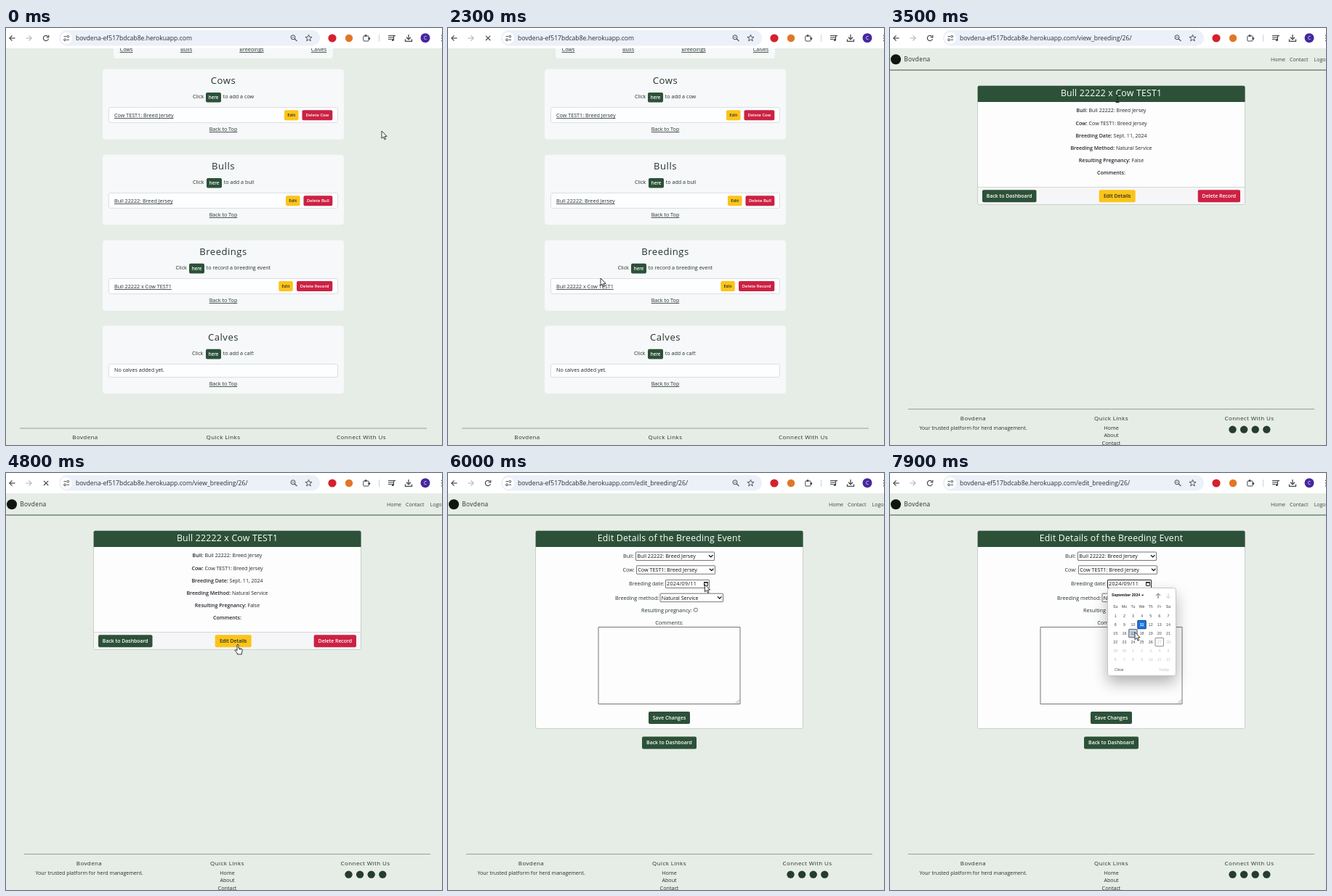
Recreate the animation shown at these times as an HTML page with a canvas. Size 600x575 px, loop 8000 ms.

```html
<!DOCTYPE html>
<html lang="en">
<head>
<meta charset="utf-8">
<title>Herd dashboard</title>
<style>
html, body { margin: 0; width: 100%; height: 100%; overflow: hidden; background: #e6ede6; }
canvas { display: block; width: 600px; height: 575px; }
</style>
</head>
<body>
<canvas id="stage" width="600" height="575"></canvas>
<script>
const ctx = document.getElementById('stage').getContext('2d');
const LOOP = 8000, STEP = 100;
const SANS = '"Open Sans", "Noto Sans", sans-serif';
const ARIAL = '"Liberation Sans", Arial, sans-serif';
const GREEN = '#2c5138', YELLOW = '#fbc41a', RED = '#cc2143', PAGE = '#e6ede6';
const INK = '#24332a', SITE = 'Bovdena';
const HOST = 'bovdena-ef517bdcab8e.herokuapp.com';

// ---- helpers ----
function box(x, y, w, h, r, fill, stroke) {
  ctx.beginPath();
  ctx.roundRect(x, y, w, h, r);
  if (fill) { ctx.fillStyle = fill; ctx.fill(); }
  if (stroke) { ctx.strokeStyle = stroke; ctx.lineWidth = 1; ctx.stroke(); }
}

function dot(x, y, r, fill) {
  ctx.beginPath();
  ctx.arc(x, y, r, 0, 7);
  ctx.fillStyle = fill;
  ctx.fill();
}

function line(color, width, ...pts) {
  ctx.beginPath();
  for (let i = 0; i < pts.length; i += 2) ctx.lineTo(pts[i], pts[i + 1]);
  ctx.strokeStyle = color;
  ctx.lineWidth = width;
  ctx.stroke();
}

function setFont({ size = 7.2, weight = 400, family = SANS, gap = 0 }) {
  ctx.font = `${weight} ${size}px ${family}`;
  ctx.letterSpacing = gap + 'px';
}

// y is the middle of the capitals
function text(s, x, y, o = {}) {
  const { size = 7.2, align = 'left', color = INK, under } = o;
  setFont(o);
  const w = ctx.measureText(s).width;
  const left = align === 'center' ? x - w / 2 : align === 'right' ? x - w : x;
  const base = y + size * 0.36;
  ctx.fillStyle = color;
  ctx.fillText(s, left, base);
  if (under) ctx.fillRect(left, Math.round(base) + 1, w, 0.8);
  return w;
}

const center = (s, x, y, o) => text(s, x, y, { align: 'center', ...o });

function button(s, x, y, w, h, fill, size, color = '#fff') {
  box(x, y, w, h, 2, fill);
  center(s, x + w / 2, y + h / 2, { size, weight: 600, color });
}

// ---- browser bar ----
function toolbar(path, loading) {
  const grey = '#46494d';
  ctx.fillStyle = '#fff';
  ctx.fillRect(0, 0, 600, 28);
  box(73, 3, 359, 21.5, 10.7, '#ebf0f9');

  line(grey, 1.2, 12.5, 14, 5, 14);
  line(grey, 1.2, 8.5, 10.3, 4.8, 14, 8.5, 17.7);
  line('#b5b7ba', 1.1, 27.5, 14, 35, 14);
  line('#b5b7ba', 1.1, 31.5, 10.3, 35.2, 14, 31.5, 17.7);

  if (loading) {
    line(grey, 1.2, 52, 10.8, 58.2, 17);
    line(grey, 1.2, 58.2, 10.8, 52, 17);
  } else {
    ctx.beginPath();
    ctx.arc(55, 14, 3.6, 0.3, 5.5);
    ctx.strokeStyle = grey;
    ctx.lineWidth = 1.2;
    ctx.stroke();
    line(grey, 1.2, 58.8, 9.8, 58.8, 12.8, 55.8, 12.8);
  }

  dot(83, 14, 8, '#fff');
  line(grey, 1, 79.5, 11.7, 83, 11.7);
  line(grey, 1, 83.5, 16.3, 87, 16.3);
  for (const [x, y] of [[85.3, 11.7], [81, 16.3]]) {
    ctx.beginPath();
    ctx.arc(x, y, 1.4, 0, 7);
    ctx.stroke();
  }

  text(HOST + path, 96, 13.8, { size: 8.6, color: '#2c2f33' });

  ctx.beginPath();
  ctx.arc(395, 12.8, 3, 0, 7);
  ctx.stroke();
  line(grey, 1.1, 397.2, 15, 400.5, 18.2);
  line(grey, 0.8, 393.5, 12.8, 396.5, 12.8);

  ctx.beginPath();
  for (let i = 0; i < 10; i++) {
    const r = i % 2 ? 2 : 4.8, a = i * Math.PI / 5 - Math.PI / 2;
    ctx.lineTo(416.5 + r * Math.cos(a), 14 + r * Math.sin(a));
  }
  ctx.closePath();
  ctx.lineWidth = 0.9;
  ctx.strokeStyle = grey;
  ctx.stroke();

  dot(449, 14, 5.6, '#d5212e');
  dot(472, 14, 5.2, '#e27625');

  box(491.8, 11, 7.4, 7, 1, null, grey);
  dot(495, 10.4, 1.5, grey);
  dot(499.8, 14.5, 1.5, grey);
  line('#c9d3e6', 1, 513.5, 9, 513.5, 19);
  for (const [y, w] of [[10.5, 8], [13, 8], [15.5, 4.5]]) line(grey, 1.1, 526, y, 526 + w, y);
  line(grey, 1.1, 533.5, 16.5, 533.5, 10.6, 536, 10.6);
  dot(532.3, 16.4, 1.6, grey);
  line(grey, 1.3, 554, 9, 554, 15.5);
  line(grey, 1.3, 551, 12.8, 554, 15.8, 557, 12.8);
  line(grey, 1.3, 549.5, 15.5, 549.5, 18.4, 558.5, 18.4, 558.5, 15.5);
  dot(577, 13.7, 6.5, '#4527a0');
  center('C', 577, 13.7, { size: 6.5, color: '#fff' });
  for (const y of [10.5, 14, 17.5]) dot(600, y, 0.9, grey);
}

// ---- pages ----
const sections = [
  { top: 56.7, h: 97, title: 'Cows', say: 'to add a cow', item: 'Cow TEST1: Breed Jersey',
    click: 257, here: 275, edit: 383, del: 407.5, kind: 'Delete Cow' },
  { top: 174.7, h: 96.5, title: 'Bulls', say: 'to add a bull', item: 'Bull 22222: Breed Jersey',
    click: 257, here: 276, edit: 385, del: 409.5, kind: 'Delete Bull' },
  { top: 292.6, h: 97.3, title: 'Breedings', say: 'to record a breeding event', item: 'Bull 22222 x Cow TEST1',
    click: 233.5, here: 252, edit: 375.3, del: 400, kind: 'Delete Record' },
  { top: 410.6, h: 93.4, title: 'Calves', say: 'to add a calf:', click: 256, here: 275 }
];
const navX = [165.5, 248, 338, 430.5];
const head = { size: 13.1, gap: 0.5, weight: 500 };
const foot = { size: 8, gap: 0.4, weight: 500 };

function footTitles(x, y) {
  [SITE, 'Quick Links', 'Connect With Us'].forEach((s, i) => center(s, x + i * 190, y, foot));
}

function dashboard() {
  box(148, 10, 302, 32, 4, '#f6f8f9');
  sections.forEach((s, i) => {
    const { top } = s, rowH = s.item ? 21 : 18;
    center(s.title, navX[i], 29.6, { under: true });
    box(133, top, 332, s.h, 4, '#f6f8f9');
    center(s.title, 299, top + 15.8, head);
    text('Click', s.click, top + 38.2);
    button('here', s.here, top + 32.2, 21, 13.6, GREEN, 6.2);
    text(s.say, s.here + 23.7, top + 38.2);
    box(141.5, Math.round(top + 52) + 0.5, 315, rowH, 2.5, '#fdfeff', '#dcdfe3');
    if (s.item) {
      text(s.item, 149, top + 63.4, { under: true });
      button('Edit', s.edit, top + 56.5, 19.5, 14, YELLOW, 6, '#2b2c20');
      button(s.kind, s.del, top + 56.5, 449.3 - s.del, 14, RED, 5.9);
    } else {
      text('No calves added yet.', 149, top + 61.2, { color: '#212529' });
    }
    center('Back to Top', 299, top + (s.item ? 82.9 : 79.6), { under: true });
  });
  line('#8fa397', 1, 19, 552, 579, 552);
  footTitles(109, 563.7);
}

function shell(title, bottom) {
  dot(8, 43.3, 7, '#101512');
  text(SITE, 19.3, 43.2, { size: 8.4, gap: 0.3, weight: 500 });
  const link = { color: '#3a4b41', size: 7.1 };
  text('Home', 524, 43, link);
  text('Contact', 550, 43, link);
  text('Logout', 583.5, 43, link);
  line('#35553f', 1, 0, 58, 600, 58);

  box(120.5, 79.5, 368, bottom - 80, 2.5, '#fdfdfe', '#c8d0ca');
  box(120.7, 79.8, 367.8, 22.2, [2, 2, 0, 0], GREEN);
  center(title, 304.5, 90, { size: 12.3, gap: 0.2, weight: 500, color: '#fff' });

  line('#8fa397', 1, 25, 525.5, 584, 525.5);
  footTitles(114.5, 538);
  center('Your trusted platform for herd management.', 114.5, 551.3, { size: 7.1 });
  ['Home', 'About', 'Contact'].forEach((s, i) => center(s, 304.5, 551.3 + i * 10.4));
  for (let i = 0; i < 4; i++) dot(471.5 + i * 15.6, 553.6, 5.2, '#263c2e');
}

const details = [
  ['Bull:', 'Bull 22222: Breed Jersey'], ['Cow:', 'Cow TEST1: Breed Jersey'],
  ['Breeding Date:', 'Sept. 11, 2024'], ['Breeding Method:', 'Natural Service'],
  ['Resulting Pregnancy:', 'False'], ['Comments:', '']
];

function detailPage() {
  shell('Bull 22222 x Cow TEST1', 244);
  details.forEach(([label, value], i) => {
    const y = 113.8 + i * 17.2, o = { size: 7.05, color: '#212529' }, bold = { ...o, weight: 600 };
    setFont(bold);
    const w1 = ctx.measureText(label).width;
    setFont(o);
    const w2 = value ? ctx.measureText(' ' + value).width : 0;
    const x = 304.5 - (w1 + w2) / 2;
    text(label, x, y, bold);
    if (value) text(' ' + value, x + w1, y, o);
  });
  box(121, 219, 367, 24, [0, 0, 2, 2], '#f6f6f8');
  line('#d3d7d5', 1, 121, 219.5, 488, 219.5);
  button('Back to Dashboard', 127, 223.2, 74.5, 17, GREEN, 6.9);
  button('Edit Details', 287.7, 223.2, 50, 17, YELLOW, 6.9, '#2b2c20');
  button('Delete Record', 423.7, 223.2, 58.3, 17, RED, 6.9);
}

function select(label, lx, value, x, y, w) {
  text(label, lx, y + 0.3);
  box(x + 0.5, y - 5.5, w - 1, 11.5, 0.5, '#fff', '#767676');
  text(value, x + 2.3, y + 0.3, { color: '#111' });
  line('#111', 1.3, x + w - 8, y - 1.3, x + w - 5.3, y + 1.4, x + w - 2.6, y - 1.3);
}

function editPage(focus) {
  shell('Edit Details of the Breeding Event', 353);
  select('Bull:', 241, 'Bull 22222: Breed Jersey', 258, 114.5, 109);
  select('Cow:', 240.5, 'Cow TEST1: Breed Jersey', 259, 133.3, 109);
  text('Breeding date:', 249, 152.8);
  box(299.5, 147.5, 60, 11, 0.5, '#fff', focus ? '#222' : '#767676');
  text('2024/09/11', 301, 152.8, { color: '#111', gap: 0.3 });
  box(352.5, 150.5, 5, 5, 0.5, null, '#222');
  line('#222', 1.6, 352, 151, 358, 151);
  select('Breeding method:', 230, 'Natural Service', 291.5, 171.7, 87.5);
  text('Resulting pregnancy:', 266, 189.3);
  box(338.5, 186.5, 4.6, 4.6, 0.8, '#fff', '#767676');
  center('Comments:', 304.5, 206.8);
  box(207, 212.5, 195, 106, 0, '#fdfdfe', '#767676');
  line('#777', 0.7, 396, 317.5, 401, 312.5);
  line('#777', 0.7, 399, 317.5, 401, 315.5);
  button('Save Changes', 276, 329, 57, 17, GREEN, 6.9);
  button('Back to Dashboard', 267, 363.5, 75, 17, GREEN, 6.9);
}

function calendar(px, py) {
  const small = { size: 5.3, family: ARIAL, color: '#444' };
  const pale = '#c4c4c4', colW = 12.1;
  ctx.save();
  ctx.shadowColor = 'rgba(0,0,0,.3)';
  ctx.shadowBlur = 20;
  ctx.shadowOffsetY = 9;
  box(299.5, 159, 94, 121, 3, '#fff');
  ctx.restore();
  box(299.5, 158.5, 94, 121, 3, '#fff', '#c4c4c4');

  text('September 2024', 305, 168.6, { ...small, size: 5.1, weight: 700, color: '#111' });
  ctx.beginPath();
  ctx.moveTo(346, 167.7);
  ctx.lineTo(349.4, 167.7);
  ctx.lineTo(347.7, 169.7);
  ctx.fillStyle = '#222';
  ctx.fill();
  line('#555', 0.9, 369, 173, 369, 166.3);
  line('#555', 0.9, 366, 169.2, 369, 166.2, 372, 169.2);
  line('#c8c8c8', 0.9, 383, 166, 383, 172.7);
  line('#c8c8c8', 0.9, 380, 169.8, 383, 172.8, 386, 169.8);

  ['Su', 'Mo', 'Tu', 'We', 'Th', 'Fr', 'Sa'].forEach((d, i) => center(d, 310.3 + i * colW, 184.3, small));
  const hover = Math.floor((py - 191) / 12) * 7 + Math.floor((px - 304.2) / colW) + 1;
  const inside = py > 191 && px > 304;
  for (let n = 1; n <= 42; n++) {
    const x = 310.3 + (n - 1) % 7 * colW, y = 197 + Math.floor((n - 1) / 7) * 12.05;
    const cell = (fill, edge) => box(x - 5.8, y - 5.7, 11.4, 11.4, 0.5, fill, edge);
    const o = { ...small, color: n > 26 ? pale : '#444' };
    if (n === 11) {
      cell('#1877e6', '#123a6b');
      Object.assign(o, { color: '#fff', weight: 700 });
    } else if (n === 27) {
      cell(null, '#8a8a8a');
    } else if (inside && n === hover && n < 27) {
      cell('#bfd0e2', '#5b6670');
    }
    center(n > 30 ? n - 30 : n, x, y, o);
  }
  text('Clear', 309, 271, { ...small, color: '#555' });
  text('Today', 384, 271, { ...small, align: 'right', color: pale });
}

// ---- pointer ----
const path = [
  [0, 517, 142], [900, 299, 306], [1800, 212, 354], [2000, 212, 354], [2300, 210, 345], [2600, 213, 330],
  [3500, 313, 97.5], [3700, 313, 97.5], [4200, 319, 236], [5300, 319, 236],
  [6100, 355, 150], [6900, 355, 150], [7300, 367, 258], [7600, 367, 258], [7900, 337, 219.5]
];
const shapes = [
  [0, 'arrow'], [900, 'beam'], [1100, 'arrow'], [1700, 'hand'], [2200, 'arrow'],
  [3400, 'beam'], [4000, 'arrow'], [4200, 'hand'], [5400, 'beam'], [5700, 'arrow']
];

function pointerAt(t) {
  const i = path.findLastIndex(k => k[0] <= t);
  const a = path[i], b = path[i + 1] || a;
  const u = b === a ? 0 : (t - a[0]) / (b[0] - a[0]);
  const e = u * u * (3 - 2 * u);
  return [a[1] + (b[1] - a[1]) * e, a[2] + (b[2] - a[2]) * e];
}

const arrow = new Path2D('M0 0V10.2L2.4 8L4 11.8L5.6 11.1L4 7.4H7.2Z');
const hand = new Path2D('M-1 1Q0-.6 1 1V5.5L5.2 6.4Q6.6 6.8 6.3 8.4L5.4 12.2V14H-.8V12.4L-4 8.6Q-3.6 6.6-1 9Z');

function pointer(x, y, kind) {
  ctx.save();
  ctx.translate(x, y);
  if (kind === 'beam') {
    line('#222', 1, 0, -5, 0, 5);
    line('#222', 1, -2.5, -5, 2.5, -5);
    line('#222', 1, -2.5, 5, 2.5, 5);
  } else {
    const p = kind === 'hand' ? hand : arrow;
    ctx.fillStyle = '#fff';
    ctx.strokeStyle = '#222';
    ctx.lineWidth = 0.9;
    ctx.fill(p);
    ctx.stroke(p);
    if (kind === 'hand') {
      line('#222', 0.7, 2.4, 6, 2.4, 8.2);
      line('#222', 0.7, 4.2, 6.4, 4.2, 8.4);
    }
  }
  ctx.restore();
}

// ---- timeline ----
function draw(t) {
  const [x, y] = pointerAt(t);
  ctx.fillStyle = PAGE;
  ctx.fillRect(0, 0, 600, 575);
  if (t < 2600) dashboard();
  else if (t < 5300) detailPage();
  else editPage(t >= 6200);
  if (t >= 6500) calendar(x, y);
  const url = t < 2600 ? '' : t < 5300 ? '/view_breeding/26/' : '/edit_breeding/26/';
  toolbar(url, (t >= 2100 && t < 2800) || (t >= 4800 && t < 5300));
  pointer(x, y, shapes.findLast(s => s[0] <= t)[1]);
}

const start = performance.now();
function tick() {
  const t = (performance.now() - start) % LOOP;
  draw(Math.floor(t / STEP) * STEP);
  requestAnimationFrame(tick);
}
tick();
</script>
</body>
</html>
```
